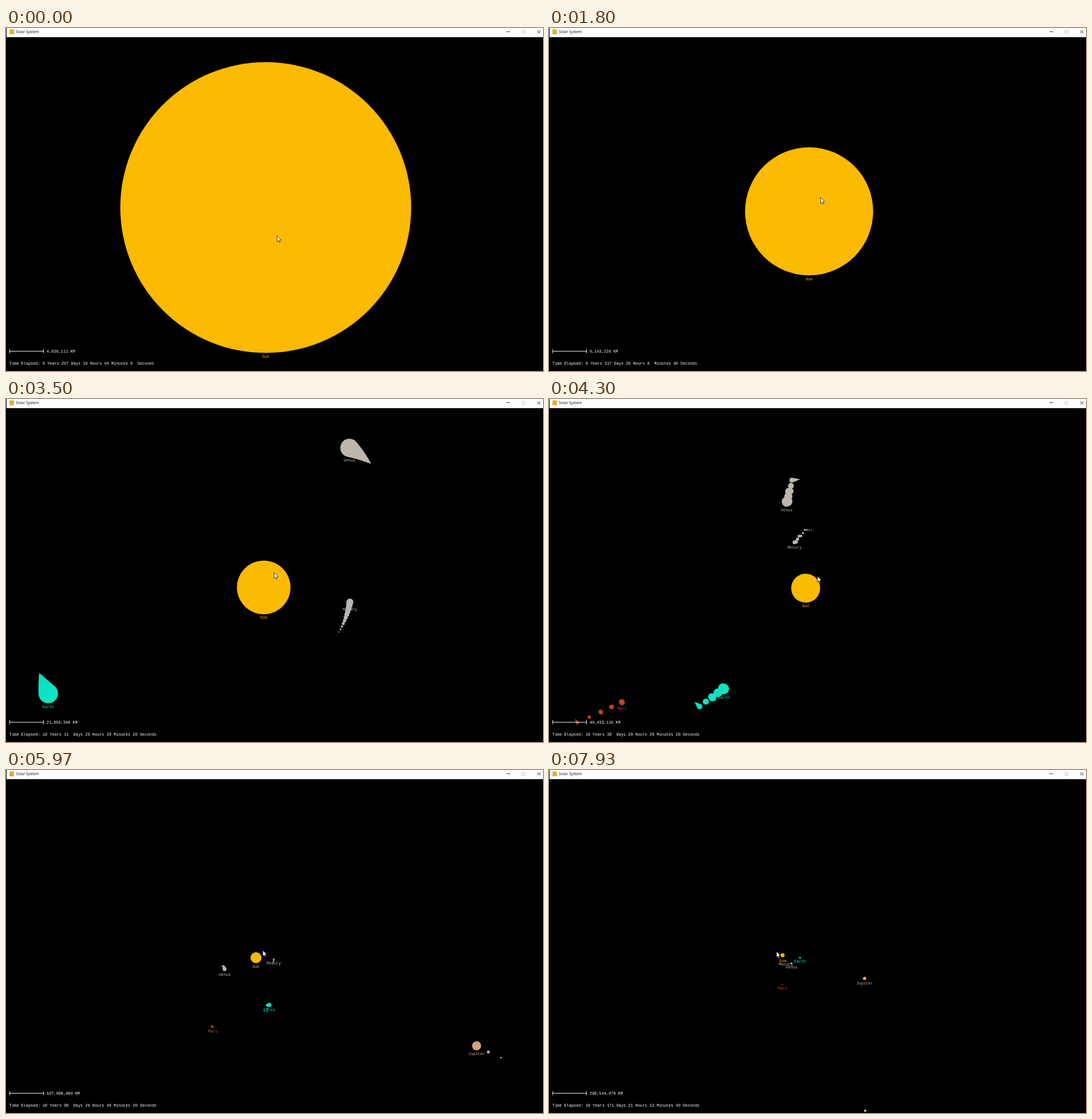
These frames come from a looping animation (936 px wide and 598 px high, 8000 ms). An HTML page with a canvas:

```html
<!DOCTYPE html>
<html lang="en">
<head>
<meta charset="utf-8">
<title>Solar System</title>
<style>
  html, body { margin: 0; width: 100%; height: 100%; overflow: hidden; background: #000; }
  canvas { display: block; }
</style>
</head>
<body>
<canvas id="stage" width="936" height="598"></canvas>
<script>
const ctx = document.getElementById('stage').getContext('2d');
const LOOP = 8000, REFRESH = 51.6, TRAIL = 12;
const MONO = '6.9px "Liberation Mono", monospace';
const BAR_KM = 4026111, CLICK_ZOOM = 1.0526, FLICK = 4;
const STEP_SECONDS = 43210;

// Key moments: simulation steps done, wheel clicks made, sun and cursor positions.
const KEYS = [
  { ms: 80, step: 0, clicks: 0, sun: [452.7, 313], cursor: [472.5, 362.5] },
  { ms: 1100, step: 58, clicks: 8, sun: [454.5, 313], cursor: [477.5, 290.5] },
  { ms: 2700, step: 158, clicks: 28, sun: [451.6, 329.8], cursor: [467.5, 302.5] },
  { ms: 3500, step: 218, clicks: 33, sun: [449.2, 328.5], cursor: [467.5, 302.5] },
  { ms: 5230, step: 340, clicks: 56, sun: [445.7, 331], cursor: [468.5, 317] },
  { ms: 6770, step: 451, clicks: 71, sun: [427, 324], cursor: [424, 311.5] },
  { ms: 7930, step: 538, clicks: 84, sun: [407.2, 323], cursor: [396.5, 316.5] }
];

// Circular orbits; radius and distance in millions of km, speed in degrees per step.
const BODIES = [
  { name: 'Sun', color: '#fcba00', radius: 17.01, distance: 0, angle: 0, speed: 0 },
  { name: 'Mecury', color: '#b5b4b8', radius: 2.25, distance: 55.5, angle: 467.5, speed: 2.1 },
  { name: 'Venus', color: '#bcb7ac', radius: 5.8, distance: 104, angle: 119, speed: 0.814 },
  { name: 'Earth', color: '#0be3c3', radius: 6.2, distance: 152.5, angle: 253.4, speed: 0.457 },
  { name: 'Mars', color: '#bd4424', radius: 3.3, distance: 254, angle: 207.4, speed: 0.218 },
  { name: 'Jupiter', color: '#d6a084', radius: 14, distance: 739, angle: 38, speed: 0.0414 },
  { name: 'Saturn', color: '#c9b681', radius: 10, distance: 1527, angle: 71, speed: 0.0167 }
];

const clamp = v => Math.min(1, Math.max(0, v));
const mix = (a, b, u) => a + (b - a) * u;
const mixPoint = (a, b, u) => a.map((v, i) => mix(v, b[i], u));

// The key moments around a value of one field, and the progress between them.
function between(field, value) {
  const after = KEYS.findIndex(key => key[field] > value);
  const i = Math.max(1, after < 0 ? KEYS.length - 1 : after);
  const a = KEYS[i - 1], b = KEYS[i];
  return { a, b, u: clamp((value - a[field]) / (b[field] - a[field])) };
}

function stepAt(ms) {
  const { a, b, u } = between('ms', ms);
  const refreshes = Math.round((b.ms - a.ms) / REFRESH);
  return Math.round(mix(a.step, b.step, Math.floor(u * refreshes + 1e-6) / refreshes));
}

// The wheel turns in quick flicks of a few clicks with rests between them.
function viewAt(step) {
  const { a, b, u } = between('step', step);
  const flicks = Math.round((b.clicks - a.clicks) / FLICK);
  const flick = Math.floor(u * flicks);
  const turned = (flick + clamp((u * flicks - flick - 0.3) / 0.3)) / flicks;
  const clicks = Math.round(mix(a.clicks, b.clicks, clamp(turned)));
  return {
    sun: mixPoint(a.sun, b.sun, (clicks - a.clicks) / (b.clicks - a.clicks)),
    cursor: mixPoint(a.cursor, b.cursor, u),
    barKm: BAR_KM * CLICK_ZOOM ** clicks
  };
}

function locate(body, step) {
  const { sun, barKm } = viewAt(step), scale = 60e6 / barKm;
  const angle = (body.angle - body.speed * step) * Math.PI / 180;
  const reach = body.distance * scale;
  return {
    x: sun[0] + reach * Math.cos(angle),
    y: sun[1] + reach * Math.sin(angle),
    radius: body.radius * scale
  };
}

function disc(x, y, r) {
  ctx.beginPath();
  ctx.arc(x, y, r, 0, 2 * Math.PI);
  ctx.fill();
}

function text(str, x, y, color, font = MONO, align = 'left') {
  ctx.font = font;
  ctx.textAlign = align;
  ctx.fillStyle = color;
  ctx.fillText(str, x, y);
}

function lines(color, ...segments) {
  ctx.strokeStyle = color;
  ctx.lineWidth = 1;
  ctx.beginPath();
  for (const [x1, y1, x2, y2] of segments) {
    ctx.moveTo(x1, y1);
    ctx.lineTo(x2, y2);
  }
  ctx.stroke();
}

// Trail dots stay where they were drawn on screen, so zooming leaves gaps.
function drawBody(body, step) {
  const head = locate(body, step);
  ctx.fillStyle = body.color;
  if (body.distance) {
    for (let i = 1; i < TRAIL; i++) {
      const dot = locate(body, step - TRAIL + i);
      disc(dot.x, dot.y, head.radius * i / TRAIL);
    }
  }
  disc(head.x, head.y, head.radius);
  text(body.name, head.x, head.y + head.radius + 8.2, body.color, MONO, 'center');
}

function elapsedText(step) {
  const total = ((9 * 365 + 267) * 24 + 19) * 3600 + 44 * 60 + step * STEP_SECONDS;
  const part = (unit, size, width) => String(Math.floor(total / unit) % size).padEnd(width);
  return `Time Elapsed: ${part(31536000, 1e4, 1)} Years ${part(86400, 365, 3)} Days ` +
    `${part(3600, 24, 2)} Hours ${part(60, 60, 2)} Minutes ${part(1, 60, 2)} Seconds`;
}

function drawWindowBar() {
  ctx.fillStyle = '#fefefe';
  ctx.fillRect(1, 0, 935, 16);
  ctx.fillStyle = '#d9b13b';
  ctx.fillRect(6, 2.5, 8, 8.5);
  text('Solar System', 17.3, 9.4, '#111', '6.7px "Open Sans", sans-serif');
  lines('#333', [872.5, 6.5, 878.5, 6.5], [926, 4, 931.5, 9.5], [931.5, 4, 926, 9.5]);
  ctx.strokeStyle = '#ccc';
  ctx.strokeRect(899.5, 4.5, 5, 5);
}

function drawCursor([x, y]) {
  const arrow = new Path2D('M0 0V10.2L2.3 8.1 3.8 11.6 5.4 10.9 3.9 7.4 7 7.2Z');
  ctx.save();
  ctx.translate(x, y);
  ctx.fillStyle = '#fff';
  ctx.fill(arrow);
  ctx.strokeStyle = '#000';
  ctx.lineWidth = 0.7;
  ctx.stroke(arrow);
  ctx.restore();
}

function draw(ms) {
  const step = stepAt(ms), view = viewAt(step);
  ctx.fillStyle = '#000';
  ctx.fillRect(0, 0, 936, 598);
  BODIES.forEach(body => drawBody(body, step));
  lines('#eee', [6.5, 563.5, 65.5, 563.5], [6.5, 560, 6.5, 567], [65.5, 560, 65.5, 567]);
  text(Math.round(view.barKm).toLocaleString('en-US') + ' KM', 70.8, 566.2, '#fff');
  text(elapsedText(step), 5.8, 586.8, '#fff');
  drawWindowBar();
  drawCursor(view.cursor);
}

const begin = performance.now();
function tick() {
  draw((performance.now() - begin) % LOOP);
  requestAnimationFrame(tick);
}
tick();
</script>
</body>
</html>
```
